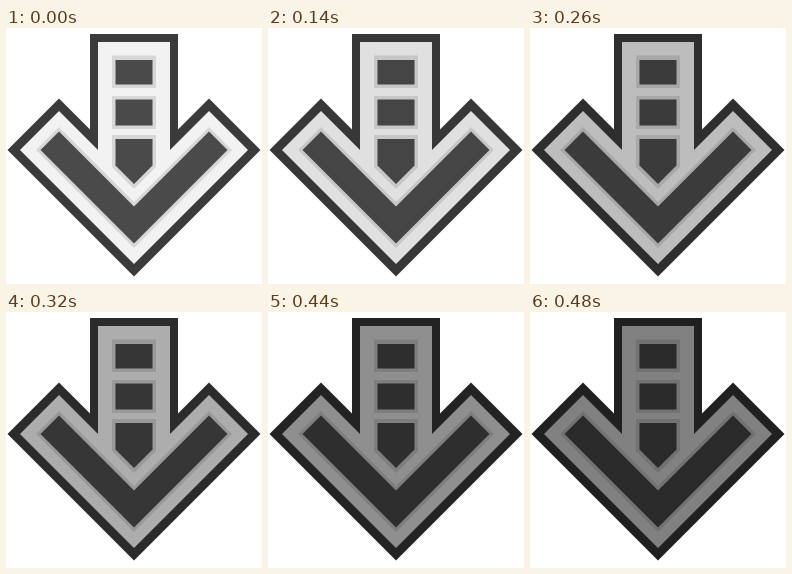
Animation, 256 px wide and 256 px high, one loop 880 ms. Source, as an HTML page:

```html
<!DOCTYPE html>
<html lang="en">
<head>
<meta charset="utf-8">
<title>Down arrow</title>
<style>
  html, body { margin: 0; width: 100%; height: 100%; overflow: hidden; background: #fff; }
  svg { display: block; width: 100vw; height: 100vh; }
</style>
</head>
<body>
<svg viewBox="0 0 256 256">
  <path id="rim" d="M84 6H172V101.500L203 70.500L254.500 122L128 248.500L1.500 122L53 70.500L84 101.500Z"/>
  <path id="face" d="M92 14H164V122L203 83L242 122L128 236L14 122L53 83L92 122Z"/>
  <g id="bevel">
    <path d="M106 27.500H150V60H106ZM106 68H150V101H106Z"/>
    <path d="M106 107H150V139L128 161L106 139Z"/>
    <path d="M53 99L128 174L203 99L226 122L128 220L30 122Z"/>
  </g>
  <g id="core">
    <path d="M109.500 32H146.500V56.500H109.500ZM109.500 71.500H146.500V97.500H109.500Z"/>
    <path d="M109.500 111H146.500V137.500L128 156L109.500 137.500Z"/>
    <path d="M53 103.500L128 178.500L203 103.500L221.500 122L128 215.500L34.500 122Z"/>
  </g>
</svg>
<script>
  const LOOP = 880;
  const STEPS = [140, 200, 260, 320, 380, 440, 480];
  // Grey level of each part at the start and end of the fade
  const TONES = {
    rim: [59, 32],
    face: [242, 129],
    bevel: [215, 114],
    core: [74, 42]
  };
  const parts = Object.entries(TONES).map(([id, range]) => [document.getElementById(id), range]);

  function draw(ms) {
    const t = ms % LOOP;
    const step = STEPS.filter(s => t >= s).length;
    const p = step / STEPS.length;
    const fade = p * (1.16 - 0.16 * p);
    for (const [el, [from, to]] of parts) {
      const v = Math.round(from + (to - from) * fade);
      el.setAttribute('fill', `rgb(${v},${v},${v})`);
    }
  }

  const start = performance.now();
  function tick() {
    draw(performance.now() - start);
    requestAnimationFrame(tick);
  }
  draw(0);
  requestAnimationFrame(tick);
</script>
</body>
</html>
```
